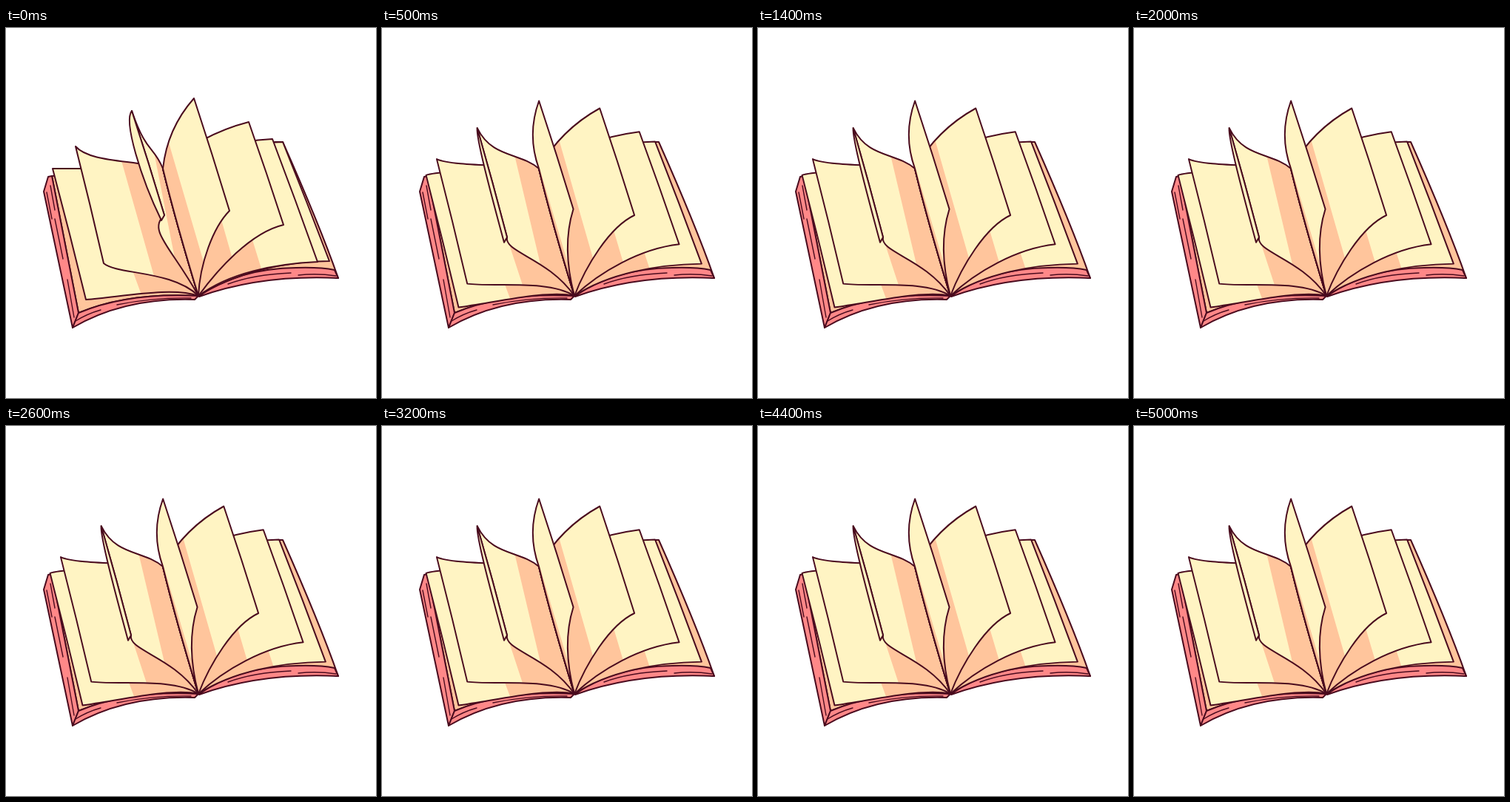
Animation of 500x500 px, one loop 5110 ms. Source, as an HTML page with a canvas:

```html
<!DOCTYPE html>
<html lang="en">
<head>
<meta charset="utf-8">
<title>Book with turning pages</title>
<style>
  html, body { margin: 0; width: 100%; height: 100%; overflow: hidden; background: #fff; }
  canvas { display: block; width: 500px; height: 500px; }
</style>
</head>
<body>
<canvas id="stage" width="500" height="500"></canvas>
<script>
const ctx = document.getElementById('stage').getContext('2d');
const INK = '#4a0b1e', CREAM = '#fff4c3', PEACH = '#ffc59c', PINK = '#ff8888';
const TOP = [212, 190], FOOT = [260, 362], SPINE = [230, 264];
const LOOP = 5110, STEP = 100, PHASES = 3, LEAVES = 7, RIGHT_LEAVES = 4;

// A turning leaf passes these places: outer top tip, outer bottom corner.
const track = [
  [374, 154, 437, 315], [360, 150, 421, 316], [328, 127, 375, 266], [254, 95, 302, 247],
  [170, 112, 214, 253], [94, 160, 132, 318], [63, 190, 108, 367], [60, 204, 102, 382]
];

const lerp = (a, b, t) => a + (b - a) * t;
const offset = ([x, y], dx, dy) => [x + dx, y + dy];

// Catmull-Rom position on the track
function along(u) {
  const i = Math.floor(u), t = u - i;
  const key = n => track[Math.max(0, Math.min(track.length - 1, n))];
  const [a, b, c, d] = [-1, 0, 1, 2].map(n => key(i + n));
  return b.map((v, n) => v + t / 2 * (c[n] - a[n]
    + t * (2 * a[n] - 5 * v + 4 * c[n] - d[n] + t * (3 * (v - c[n]) + d[n] - a[n]))));
}

function bezier([a, b, c, d], t) {
  const u = 1 - t;
  return [0, 1].map(i => u*u*u*a[i] + 3*u*u*t*b[i] + 3*u*t*t*c[i] + t*t*t*d[i]);
}

function paint(path, fill, width = 2) {
  if (fill) {
    ctx.fillStyle = fill;
    ctx.fill(path);
  }
  ctx.lineWidth = width;
  if (width) ctx.stroke(path);
}

const shape = (d, fill, width) => paint(new Path2D(d), fill, width);

// Right leaves arch evenly
function rightEdges(tip, corner) {
  const dx = tip[0] - TOP[0], dy = tip[1] - TOP[1], bow = 11 / Math.hypot(dx, dy);
  const arch = t => offset(TOP, dx * t + dy * bow, dy * t - dx * bow);
  const reach = corner[0] - FOOT[0];
  return [
    [TOP, arch(1 / 3), arch(2 / 3), tip],
    [FOOT, offset(FOOT, .33 * reach - 12, .1 * reach - 47),
      offset(corner, -.3 * reach - 10, 30 - .17 * reach), corner]
  ];
}

// Left leaves sag in an S the higher they stand
function leftEdges(tip, corner) {
  const rise = TOP[1] - tip[1], lift = FOOT[1] - corner[1];
  return [
    [TOP, offset(TOP, .3 * (tip[0] - TOP[0]), -.4 * rise), offset(tip, 20, .75 * rise), tip],
    [FOOT, offset(FOOT, -35, -15 - .45 * lift),
      offset(corner, 47 - .65 * lift, Math.min(20, .4 * lift - 2)), corner]
  ];
}

const outerBend = (tip, corner) => [(tip[0] + corner[0]) / 2 + 1, (tip[1] + corner[1]) / 2];

function drawLeaf(leaf, u) {
  const place = along(u), tip = place.slice(0, 2), corner = place.slice(2);
  const [top, bottom] = (leaf < RIGHT_LEAVES ? rightEdges : leftEdges)(tip, corner);
  const page = new Path2D();
  page.moveTo(...TOP);
  page.bezierCurveTo(...top.slice(1).flat());
  page.quadraticCurveTo(...outerBend(tip, corner), ...corner);
  page.bezierCurveTo(...bottom[2], ...bottom[1], ...FOOT);
  page.quadraticCurveTo(...SPINE, ...TOP);
  page.closePath();
  paint(page, CREAM, 0);

  // The shadow by the spine is narrowest on upright leaves
  const share = .28 + .11 * Math.abs(u - 3.6), n = 16;
  const shade = new Path2D();
  for (let i = 0; i <= n; i++) shade.lineTo(...bezier(top, share * i / n));
  for (let i = n; i >= 0; i--) shade.lineTo(...bezier(bottom, share * i / n));
  shade.quadraticCurveTo(...SPINE, ...TOP);
  ctx.save();
  ctx.clip(page);
  paint(shade, PEACH, 0);
  ctx.restore();
  paint(page);
  if (leaf === RIGHT_LEAVES) drawCurl(tip, corner);
}

// Curled outer edge of the upright left leaf
function drawCurl(tip, corner) {
  const width = 4 + (tip[0] - 122) / 4;
  const bulge = t => [lerp(tip[0], corner[0], t) - width, lerp(tip[1], corner[1], t)];
  const strip = new Path2D();
  strip.moveTo(...tip);
  strip.bezierCurveTo(...bulge(.1), ...bulge(.65), ...offset(corner, -4, 7));
  strip.lineTo(...corner);
  strip.quadraticCurveTo(...outerBend(tip, corner), ...tip);
  paint(strip, CREAM);
}

function drawCover() {
  // Right block
  shape('M212 191L364 154L374 154C398 208 425 270 449 338Q345 318 261 362Z', PEACH);
  shape('M261 362Q315 325 392 324Q425 323 444 327L449 338Q345 333 261 363Z', PINK);
  shape('M300 346Q335 333 385 331M395 334Q420 331 446 335', null, 1.4);
  // Left block
  shape('M62 200L212 191L260 362Q165 357 98 385Z', PEACH);
  shape('M51 221L57 201L62 200L98 385L90 405Z', PINK);
  shape('M260 362Q165 357 98 385L90 405Q160 364 255 367Z', PINK);
  shape('M55 222L62 258M60 213L66 246M66 258L77 312M83 340L92 391'
    + 'M94 396Q110 386 128 381M150 374Q200 364 250 365', null, 1.4);
}

function draw() {
  const time = (performance.now() - start) % LOOP;
  const tick = Math.min(Math.floor(time / STEP), LOOP / STEP - 1 | 0);
  const phase = tick % PHASES / (PHASES - 1);
  ctx.fillStyle = '#fff';
  ctx.fillRect(0, 0, 500, 500);
  ctx.strokeStyle = INK;
  ctx.lineJoin = ctx.lineCap = 'round';
  drawCover();
  const turn = leaf => drawLeaf(leaf, leaf + phase / 2);
  for (let leaf = LEAVES - 1; leaf >= RIGHT_LEAVES; leaf--) turn(leaf);
  for (let leaf = 0; leaf < RIGHT_LEAVES; leaf++) turn(leaf);
  requestAnimationFrame(draw);
}

const start = performance.now();
draw();
</script>
</body>
</html>
```
